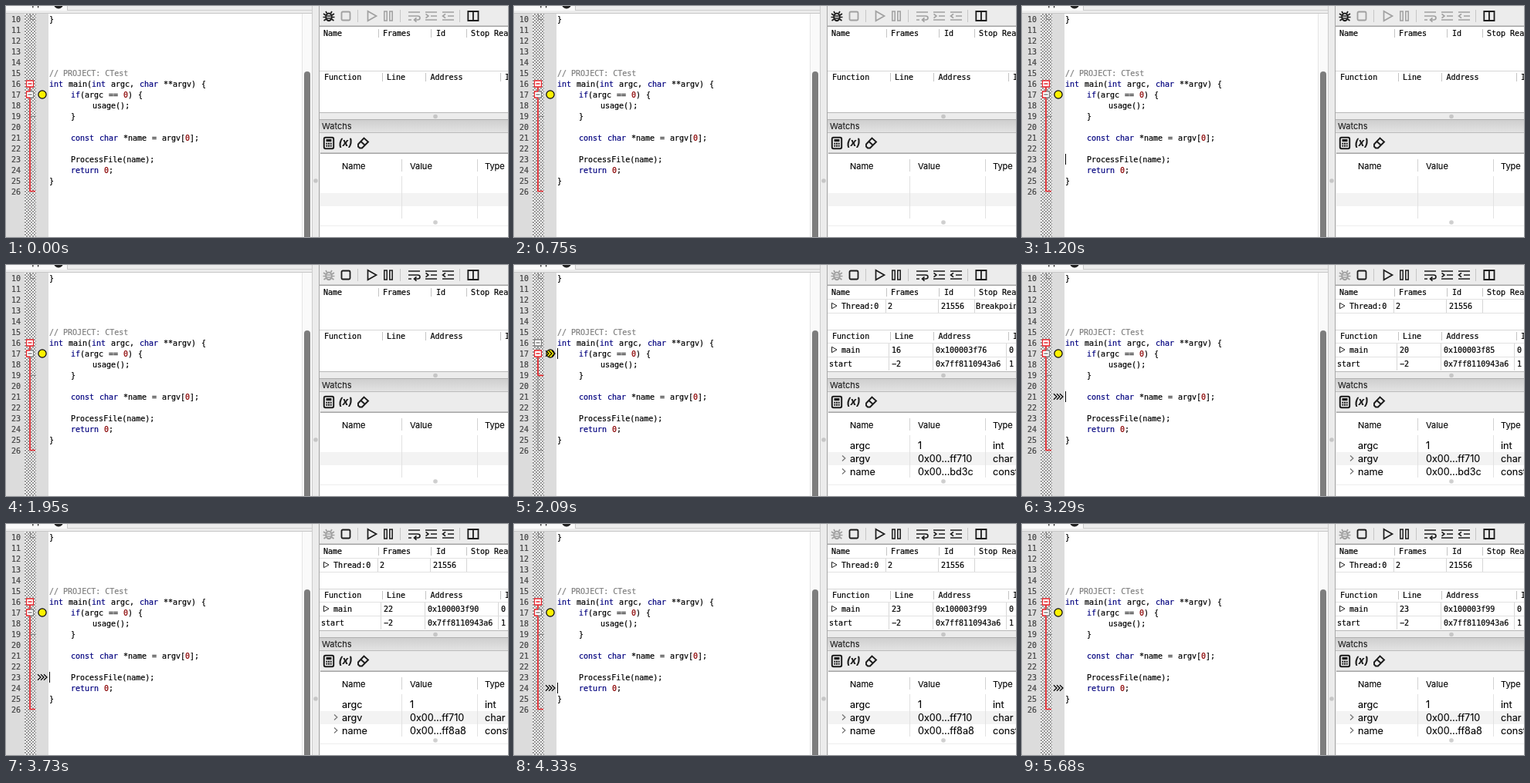
Animation of 650 by 300 pixels, one loop 6120 ms. Source, as an HTML page:

```html
<!DOCTYPE html>
<html lang="en">
<head>
<meta charset="utf-8">
<style>
html, body { margin: 0; width: 100%; height: 100%; overflow: hidden; background: #fff; }
svg { display: block; }
text { white-space: pre; }
.mono { font: 10px "DejaVu Sans Mono", monospace; stroke-width: .2px; }
.ui { font: 11px Inter, sans-serif; stroke-width: .1px; }
.cell { font: 12.6px Inter, sans-serif; stroke-width: .1px; }
</style>
</head>
<body>
<svg id="stage" width="650" height="300" viewBox="0 0 650 300"></svg>
<script>
const LOOP = 6120, BLINK = 450, ADVANCE = 6.02, SPACE = 6.9;
const RED = '#e8262c', GRAY = '#808080', INK = '#1c1c1c', FAINT = '#a0a0a0';

const source = {
  10: '}',
  15: '// PROJECT: CTest',
  16: 'int main(int argc, char **argv) {',
  17: '\tif(argc == 0) {',
  18: '\t\tusage();',
  19: '\t}',
  21: '\tconst char *name = argv[0];',
  23: '\tProcessFile(name);',
  24: '\treturn 0;',
  25: '}'
};

// Debugger steps: start time, current line, end of the program counter
const steps = [
  { at: 0, line: 23 },
  { at: 1950, running: true },
  { at: 2090, line: 17, pc: '76', running: true },
  { at: 3290, line: 21, pc: '85', running: true },
  { at: 3730, line: 23, pc: '90', running: true },
  { at: 4330, line: 24, pc: '99', running: true }
];

const mid = line => 101 + 14 * (line - 16);
const rect = (x, y, w, h, fill, more = '') =>
  `<rect x="${x}" y="${y}" width="${w}" height="${h}" fill="${fill}" ${more}/>`;
const path = (d, stroke, width = 1, fill = 'none') =>
  `<path d="${d}" stroke="${stroke}" stroke-width="${width}" fill="${fill}"/>`;
const dot = (x, y, r, fill, more = '') =>
  `<circle cx="${x}" cy="${y}" r="${r}" fill="${fill}" ${more}/>`;
const text = (x, y, s, kind = 'mono', fill = '#000', more = '') =>
  `<text x="${x}" y="${y}" class="${kind}" fill="${fill}" stroke="${fill}" ${more}>${s}</text>`;
const vlines = (xs, y, h, fill) => xs.map(x => rect(x, y, 1, h, fill)).join('');
const labels = (xs, y, words, kind) => words.map((w, i) => text(xs[i], y, w, kind)).join('');

// Spaces between words are wider than the letters
function codeLine(n) {
  const y = mid(n) + 3.5, s = source[n] || '';
  if (s.startsWith('//')) return text(56, y, s, 'mono', '#7f7f7f');
  let x = 56, out = '';
  for (const run of s.match(/\t|\w+| |[^\w\s]+/g) || []) {
    if (run === '\t') { x += 28; continue; }
    if (run === ' ') { x += SPACE; continue; }
    const fill = /^(int|char|const|if|return)$/.test(run) ? '#00007f' : /^\d/.test(run) ? '#8b0000' : '#000';
    out += text(x.toFixed(2), y, run, 'mono', fill);
    x += run.length * ADVANCE;
  }
  return out;
}

function editorBase() {
  let out = rect(0, 0, 397, 9, '#ececec') + rect(0, 0, 79, 6, '#fafafa') +
    rect(79, 0, 1, 6, '#c8c8c8') + rect(79, 5, 318, 1, '#cfcfcf') +
    text(47, 0, 'main.cpp', 'ui', '#000', 'text-anchor="end" font-weight="600"') +
    dot(68, -2.5, 6, '#222') +
    rect(0, 9, 24, 291, '#dcdcdc') + rect(24, 9, 15, 291, 'url(#check)') +
    rect(39, 9, 16, 291, '#dcdcdc') + rect(0, 9, 397, 1, '#c8c8c8') +
    rect(383, 10, 14, 290, '#fafafa') + rect(383, 10, 1, 290, '#e4e4e4') +
    rect(386, 85, 8, 230, '#7d7d7d', 'rx="4"') +
    rect(397, 0, 8, 300, '#ececec') + rect(396, 0, 1, 300, '#cccccc') + dot(401, 227, 2.8, '#c6c6c6');
  for (let n = 10; n <= 26; n++) out += text(7, mid(n) + 3.5, n, 'mono', '#444') + codeLine(n);
  return out;
}

function panelBase() {
  return rect(405, 0, 245, 300, '#ececec') +
    rect(405, 26, 245, 113, '#fff') + rect(405, 25.5, 245, 1.5, '#a4a4a4') +
    labels([411, 488, 557, 602], 38.5, ['Name', 'Frames', 'Id', 'Stop Reason']) +
    vlines([482, 550, 596], 30, 11, '#c4c4c4') +
    rect(405, 84, 245, 1, '#d6d6d6') +
    labels([412, 493, 549.5, 646], 95.5, ['Function', 'Line', 'Address', 'Id']) +
    vlines([487, 543, 640], 87, 11, '#c4c4c4') +
    rect(405, 138, 245, 1, '#b8b8b8') + dot(556, 143.5, 2.8, '#c6c6c6') +
    rect(405, 147, 245, 18, 'url(#caption)') + rect(405, 147, 245, 1, '#b0b0b0') +
    rect(405, 164, 245, 1, '#bcbcbc') + text(409, 160, 'Watchs', 'ui', INK) +
    // calculator
    rect(411.8, 170.8, 12.4, 14.4, 'none', `rx="2" stroke="${INK}" stroke-width="2"`) +
    rect(414.5, 173, 7, 3.2, INK) +
    [177.7, 180.7].map(y => [414.3, 417, 419.7].map(x => rect(x, y, 2, 2, INK)).join('')).join('') +
    text(430.5, 182, '(x)', 'ui', INK, 'style="font:italic 700 13.5px Inter,sans-serif"') +
    // eraser
    path('M456 179.5L463.5 171.5L469 176.5L461 184.5H458L456 182.5ZM459.5 176L465 181', INK, 1.9) +
    rect(407, 191, 243, 109, '#fff') + rect(407, 190.5, 243, 1.5, '#a4a4a4') +
    rect(405, 0, 1, 300, '#a8a8a8') +
    labels([435, 523, 620], 211.5, ['Name', 'Value', 'Type'], 'ui') +
    rect(407, 243, 243, 17, '#f3f3f3') +
    vlines([512, 610], 199, 16, '#d2d2d2') + vlines([512, 610], 221, 55, '#e2e2e2') +
    dot(556, 281, 2.8, '#cfcfcf') + rect(407, 285, 243, 1, '#ededed');
}

function toolbar(running) {
  const on = running ? INK : FAINT, bug = running ? FAINT : INK;
  return vlines([455, 510, 587], 5, 16, '#c6c6c6') +
    `<ellipse cx="418" cy="14.3" rx="3.6" ry="4.8" fill="none" stroke="${bug}" stroke-width="2.2"/>` +
    path('M415.5 9.5L414 7M420.5 9.5L422 7M414 12L411 10M422 12L425 10M414 14.5H410.5M422 14.5H425.5M414.5 17L411.5 19M421.5 17L424.5 19M416 13H420M416 16H420', bug, 1.7) +
    rect(434.5, 7.5, 11, 11, 'none', `rx="1.5" stroke="${on}" stroke-width="1.8"`) +
    path('M468.5 6.8L479.5 13L468.5 19.2Z', on, 1.7) +
    rect(489.8, 7, 3.4, 12, 'none', `stroke="${on}" stroke-width="1.5"`) +
    rect(496.8, 7, 3.4, 12, 'none', `stroke="${on}" stroke-width="1.5"`) +
    path('M521 8H536M521 13H533Q536 13 536 15.5T533 18H529M531.5 15.3L528.5 18L531.5 20.7M521 18H525', on, 1.6) +
    path('M543 8H558M550 13H558M543 18H558M543.5 10.3L547 13L543.5 15.7', on, 1.6) +
    path('M565 8H580M572 13H580M565 18H580M569 10.3L565.5 13L569 15.7', on, 1.6) +
    path('M598.3 7H611.5V19H598.3ZM604.9 7V19', INK, 1.8);
}

function foldBox(y, left, right) {
  return rect(26.5, y - 4, 9, 8, '#fff') +
    path(`M31 ${y - 4}H35.5V${y + 4}H31M28.5 ${y}H33.5`, right, 1.3) +
    path(`M31 ${y - 4}H26.5V${y + 4}H31`, left, 1.3);
}

function folds(inner) {
  const outerInk = inner ? GRAY : RED;
  const l19 = mid(19) + .5, l26 = mid(26) - .5;
  return path('M31.5 10V17.5H38', GRAY) +
    path(`M31 105V${l26}H38`, outerInk, inner ? 1 : 1.7) +
    path(`M31 ${l19}H38`, inner ? RED : GRAY, inner ? 1.7 : 1) +
    (inner ? path(`M31 119V${l19}`, RED, 1.7) : '') +
    foldBox(mid(16), outerInk, outerInk) +
    foldBox(mid(17), RED, inner ? RED : GRAY);
}

function arrows(line) {
  const y = mid(line);
  return [41, 45, 49].map(x => path(`M${x} ${y - 3.8}L${x + 4} ${y}L${x} ${y + 3.8}`, '#000', 1.2)).join('');
}

function debugData({ line, pc }) {
  const tri = y => path(`M411.5 ${y - 3.7}L418 ${y}L411.5 ${y + 3.7}Z`, '#222');
  const fold = y => path(`M425 ${y - 3.5}L428.8 ${y}L425 ${y + 3.5}`, '#777', 1.3);
  const name = line < 23 ? '0x00...bd3c' : '0x00...ff8a8';
  const watch = [435, 523, 620], stack = [424, 489, 546, 641];
  return vlines([481, 549, 596], 44, 18, '#d6d6d6') + rect(406, 44, 244, 1, '#e2e2e2') +
    rect(406, 62, 244, 1, '#e2e2e2') + tri(53) +
    labels([424, 484, 553, 598], 56.5, ['Thread:0', 2, 21556, line === 17 ? 'Breakpoint' : '']) +
    vlines([485, 542, 637], 101, 36, '#d6d6d6') + rect(406, 101, 244, 1, '#e2e2e2') +
    rect(406, 119, 244, 1, '#e2e2e2') + tri(110) +
    labels(stack, 113.5, ['main', line - 1, '0x100003f' + pc, 0]) +
    labels([408, ...stack.slice(1)], 131.5, ['start', '−2', '0x7ff8110943a6', 1]) +
    labels(watch, 239, ['argc', 1, 'int'], 'cell') +
    labels(watch, 256, ['argv', '0x00...ff710', 'char **'], 'cell') +
    labels(watch, 273, ['name', name, 'const char *'], 'cell') + fold(251) + fold(268);
}

const defs = `<defs>
  <pattern id="check" width="4" height="4" patternUnits="userSpaceOnUse">
    <path d="M0 0H4V4H0Z" fill="#f6f6f6"/><path d="M0 0H2V2H0ZM2 2H4V4H2Z" fill="#999"/></pattern>
  <linearGradient id="caption" x2="0" y2="1">
    <stop stop-color="#cdcdcd"/><stop offset="1" stop-color="#e4e4e4"/></linearGradient></defs>`;
const stage = document.getElementById('stage');
stage.innerHTML = defs + editorBase() + panelBase() + '<g id="live"></g>';
const live = document.getElementById('live');

function caretOn(t, step) {
  if (!step.line) return false;
  // before the program runs the caret stays lit after its second blink
  const age = step.pc ? t - step.at : Math.min(t, 1600) - 300;
  return Math.floor(age / BLINK) % 2 === 0;
}

let shown = '';
function frame(now) {
  const t = now % LOOP;
  const step = steps.filter(s => s.at <= t).pop(), caret = caretOn(t, step);
  const key = step.at + ':' + caret;
  if (key !== shown) {
    shown = key;
    live.innerHTML = toolbar(step.running) + folds(step.pc && step.line === 17) +
      dot(47, mid(17), 5.1, '#fff200', 'stroke="#000" stroke-width="1.2"') +
      (step.pc ? arrows(step.line) + debugData(step) : '') +
      (caret ? rect(56, mid(step.line) - 7, 1, 14, '#000') : '');
  }
  requestAnimationFrame(frame);
}
frame(0);
</script>
</body>
</html>
```
